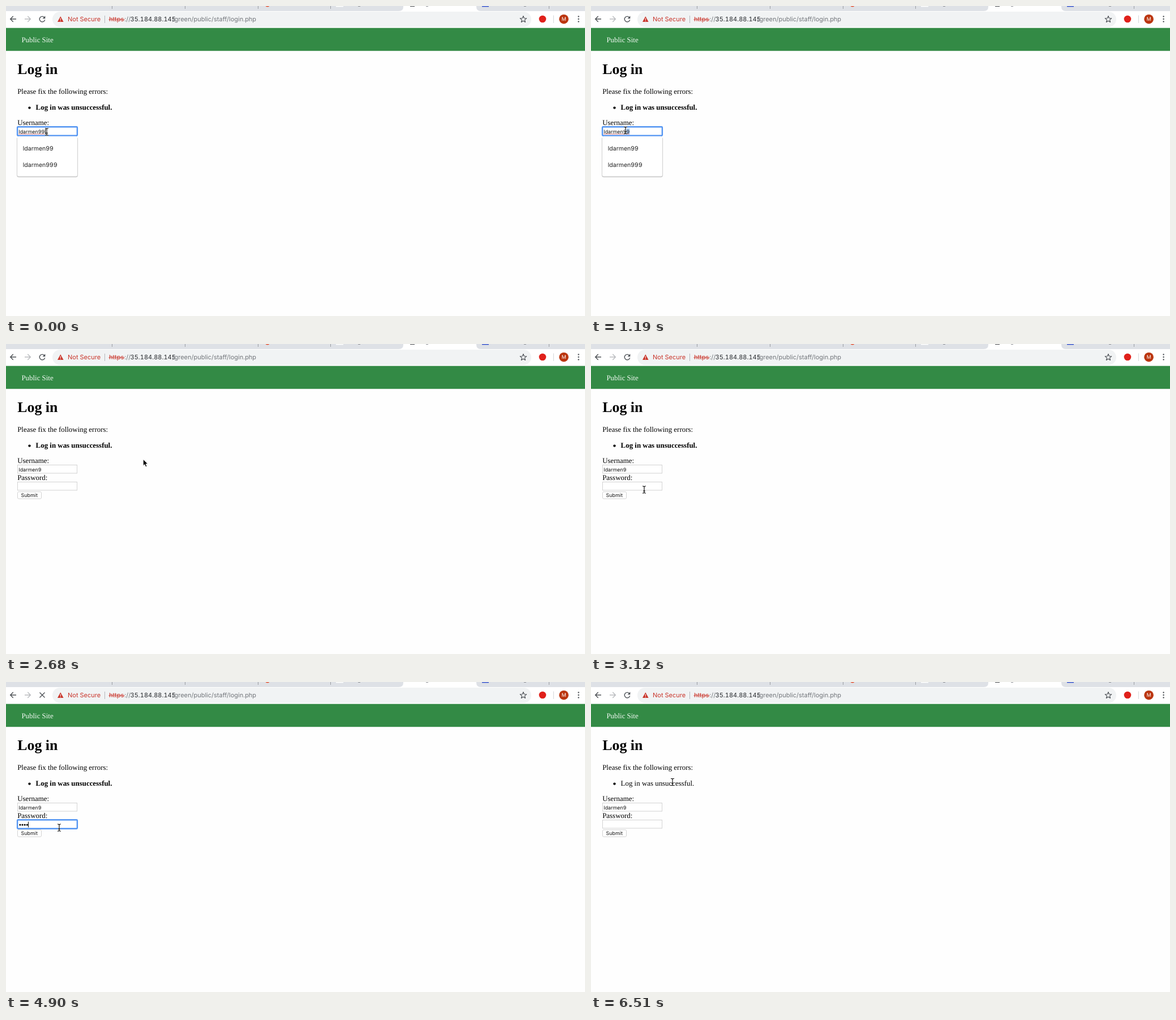
An HTML page for the animation above (8000 ms loop, 1023 by 547 pixels).

```html
<!DOCTYPE html>
<html lang="en">
<head>
<meta charset="utf-8">
<title>Log in</title>
<style>
  html, body { margin: 0; width: 100%; height: 100%; overflow: hidden; background: #fefefe; }
  svg { display: block; width: 100vw; height: 100vh; }
  text { text-rendering: geometricPrecision; white-space: pre; font-variant-numeric: tabular-nums; }
  .serif { font-family: "Liberation Serif", serif; font-size: 12.92px; fill: #000; }
  .bar { font-family: Inter, sans-serif; font-size: 11px; fill: #72767b; }
  .field { font-family: Inter, sans-serif; font-size: 8.9px; fill: #111; }
  .option { font-family: Inter, sans-serif; font-size: 10.5px; fill: #222; }
  .icon { fill: none; stroke: #4d5156; stroke-width: 1.4; }
  .box { fill: #fff; stroke: #d2d2d2; }
  .focus { fill: #fff; stroke: #5294f2; stroke-width: 2.4; }
  .caret { stroke: #000; stroke-width: 1; }
</style>
</head>
<body>
<svg viewBox="0 0 1023 547" preserveAspectRatio="none">
  <rect width="1023" height="547" fill="#fefefe"/>

  <!-- tab strip -->
  <rect width="1023" height="9" fill="#dee1e6"/>
  <path d="M694 9Q702 9 702 1V0H831V1Q831 9 839 9Z" fill="#fff"/>
  <path d="M187.5 0V5M316.5 0V5M445.5 0V5M573.5 0V5M959.5 0V5" stroke="#9a9da2"/>
  <circle cx="462" cy="-2.5" r="4" fill="#e5502f"/>
  <rect x="583" width="13" height="1.5" fill="#fff"/>
  <rect x="841" width="12" height="1.5" fill="#3f5bd0"/>
  <path d="M622 .5h4M742 .5h4M915 .5h4" stroke="#8d9095"/>
  <rect id="favicon" x="714" width="8" height="1" fill="#44474b"/>

  <!-- toolbar -->
  <rect y="9" width="1023" height="30" fill="#fff"/>
  <rect x="82" y="10" width="846" height="27" rx="13.5" fill="#f1f3f4"/>
  <path class="icon" d="M18 23H8M12.7 18L7.7 23L12.7 28"/>
  <path class="icon" style="stroke:#babcbf" d="M33 23H43M38.3 18L43.3 23L38.3 28"/>
  <g id="reload">
    <path class="icon" d="M68 20.4A4.8 4.8 0 1 0 68.7 24.4"/>
    <path d="M69.3 17.6V22.3H64.6Z" fill="#4d5156"/>
  </g>
  <path id="stop" class="icon" d="M59.5 18.5L68.5 27.5M68.5 18.5L59.5 27.5"/>
  <path d="M96.3 18.3L101.6 28H91Z" fill="#c9352b"/>
  <path d="M96.3 21.6V24.8M96.3 25.7V26.9" stroke="#fff" stroke-width="1.1"/>
  <text class="bar" x="109" y="27.3" style="fill:#c9352b">Not Secure</text>
  <path d="M174.5 17V30" stroke="#b4b7bb"/>
  <text class="bar" x="182" y="27.3" style="fill:#c9352b">https</text>
  <path d="M181.5 24H209.5" stroke="#c9352b"/>
  <text class="bar" x="209.3" y="27.3">://</text>
  <text class="bar" x="219.6" y="27.3" style="fill:#2b2e32">35.184.88.145</text>
  <text class="bar" x="293.5" y="27.3">/green/public/staff/login.php</text>
  <path id="star" class="icon" style="stroke-width:1.2" stroke-linejoin="round"/>
  <circle cx="948" cy="23" r="6.3" fill="#e0211b"/>
  <path d="M967.5 16.5V30" stroke="#d5d7da"/>
  <circle cx="985.6" cy="23.2" r="8.3" fill="#bb3610"/>
  <text x="985.6" y="26.4" text-anchor="middle" style="font:9px Roboto,sans-serif;fill:#fff">M</text>
  <g fill="#4d5156">
    <circle cx="1011.6" cy="18.5" r="1.2"/><circle cx="1011.6" cy="23" r="1.2"/><circle cx="1011.6" cy="27.5" r="1.2"/>
  </g>

  <!-- page -->
  <rect y="38.7" width="1023" height="40.5" fill="#338a45"/>
  <text class="serif" x="27.4" y="64" style="fill:#f4faf5">Public Site</text>
  <text class="serif" x="20.3" y="120" style="font-size:25.84px;font-weight:bold">Log in</text>
  <text class="serif" x="20.2" y="155.3">Please fix the following errors:</text>
  <circle cx="41.5" cy="179.6" r="2.2"/>
  <text class="serif" id="error" x="52.6" y="182.9">Log in was unsuccessful.</text>
  <text class="serif" x="20.2" y="210.3">Username:</text>
  <text class="serif" x="20.2" y="240.3">Password:</text>
  <rect class="box" x="20.5" y="260.8" width="42" height="12.2" rx="2"/>
  <text class="field" x="26.6" y="270.1">Submit</text>
  <rect id="userBox"/>
  <rect id="passBox"/>
  <rect id="selection" y="216" height="10.5" fill="#b4d5fe"/>
  <text class="field" id="user" x="22.5" y="225"/>
  <path id="squiggle" fill="none" stroke="#dd4b45" stroke-dasharray="1.6 .8"/>
  <g id="dots"></g>
  <path id="userCaret" class="caret"/>
  <path id="passCaret" class="caret"/>

  <!-- suggestions -->
  <g id="list">
    <rect id="listGlow" x="18.8" y="231.6" width="108.4" rx="3.5" fill="#000" opacity=".07"/>
    <rect id="listShade" x="19.5" y="230.8" width="107" rx="3" fill="#000" opacity=".24"/>
    <rect id="listBox" x="20" y="229.8" width="106" rx="2.5" fill="#fff"/>
    <g id="options"></g>
  </g>

  <!-- pointers -->
  <g id="beam" fill="none">
    <path id="beamHalo" stroke="#fff" stroke-width="2.6" opacity=".8"/>
    <path id="beamLine" stroke="#000" stroke-width="1.1"/>
  </g>
  <path id="arrow" d="M0 0V11.4L2.6 9L4.5 13.2L6.5 12.3L4.7 8.2H8.2Z" fill="#000" stroke="#fff" stroke-width=".8"/>
</svg>
<script>
const LOOP = 8000;
const NAME = 'ldarmen';
const $ = id => document.getElementById(id);
const set = (id, attrs) => {
  for (const key in attrs) $(id).setAttribute(key, attrs[key]);
};
const show = (id, on) => set(id, { visibility: on ? 'visible' : 'hidden' });

// Each step overrides part of the state from its time on.
const steps = [
  [0, { user: '99', focus: 'user', options: ['99', '999'], userCaret: 69.5, select: 0, passCaret: 0,
        dots: 0, loading: false, icon: true, bold: true, shape: 'beam', at: [72, 222] }],
  [150, { at: [66, 222] }],
  [420, { at: [60, 222], select: 62.2, userCaret: 0 }],
  [570, { at: [53, 221], select: 51.5 }],
  [720, { at: [49.5, 220] }],
  [870, { at: [53, 220] }],
  [1040, { at: [58, 219.5], select: 56.7 }],
  [1190, { at: [61, 219.5], select: 62.2 }],
  [2090, { user: '9', options: ['9', '99', '999'], select: 0, userCaret: 63.5 }],
  [2390, { at: [150, 208], shape: 'arrow' }],
  [2540, { at: [242.4, 198], focus: '', options: [], userCaret: 0 }],
  [2680, { at: [242.4, 203.5] }],
  [2830, { at: [190, 226] }],
  [2980, { at: [120, 250], shape: 'beam' }],
  [3120, { at: [94, 257] }],
  [3270, { focus: 'pass', passCaret: 23.5 }],
  [3870, { passCaret: 0 }],
  ...[4020, 4170, 4310, 4460].map((t, i) => [t, { dots: i + 1, passCaret: 27 + 4.15 * i }]),
  [4900, { loading: true, icon: false }],
  [5050, { passCaret: 0 }],
  [5350, { focus: '', dots: 0, bold: false }],
  [5500, { loading: false }],
  [5700, { icon: true }],
  [6010, { at: [97, 250] }],
  [6170, { at: [114, 230], shape: 'arrow' }],
  [6330, { at: [131.8, 202] }],
  [6510, { at: [144, 176.5], shape: 'beam' }]
];

const star = Array.from({ length: 10 }, (_, i) => {
  const r = i % 2 ? 2.6 : 6, a = Math.PI * (i / 5 - .5);
  return [914 + r * Math.cos(a), 23.6 + r * Math.sin(a)].join(' ');
});
set('star', { d: `M${star.join('L')}Z` });

const beam = 'M-3 -6.2Q0 -6.2 0 -4.8Q0 -6.2 3 -6.2M0 -4.8V4.8M-3 6.2Q0 6.2 0 4.8Q0 6.2 3 6.2M-1.7 2.4H1.7';
set('beamHalo', { d: beam });
set('beamLine', { d: beam });

function drawBox(id, y, focused) {
  set(id, focused
    ? { class: 'focus', x: 20.1, y: y - .3, width: 105.8, height: 15.6, rx: 1.2 }
    : { class: 'box', x: 20.5, y, width: 105, height: 14.5, rx: 0 });
}

function drawCaret(id, x, y) {
  show(id, x > 0);
  set(id, { d: `M${x} ${y}v10` });
}

function drawList(options) {
  show('list', options.length);
  const height = 13 + 29 * options.length;
  for (const id of ['listBox', 'listShade', 'listGlow']) set(id, { height });
  $('options').innerHTML = options
    .map((end, i) => `<text class="option" x="29.8" y="${254.8 + 29 * i}">${NAME + end}</text>`).join('');
}

function draw(t) {
  const s = Object.assign({}, ...steps.filter(([start]) => start <= t).map(step => step[1]));
  show('favicon', s.icon);
  show('reload', !s.loading);
  show('stop', s.loading);
  $('error').style.fontWeight = s.bold ? 'bold' : 'normal';

  drawBox('userBox', 213.5, s.focus === 'user');
  drawBox('passBox', 243.5, s.focus === 'pass');
  $('user').textContent = NAME + s.user;
  show('selection', s.select);
  set('selection', { x: s.select, width: s.select ? 68.5 - s.select : 0 });
  show('squiggle', s.focus === 'user');
  set('squiggle', { d: `M22.5 226H${57 + 5.6 * s.user.length}` });
  drawCaret('userCaret', s.userCaret, 216.5);
  drawCaret('passCaret', s.passCaret, 246.5);
  $('dots').innerHTML = Array.from({ length: s.dots },
    (_, i) => `<circle cx="${24.9 + 4.15 * i}" cy="252" r="1.6"/>`).join('');
  drawList(s.options);

  show('beam', s.shape === 'beam');
  show('arrow', s.shape === 'arrow');
  set(s.shape, { transform: `translate(${s.at})` });
}

const begin = performance.now();
function tick() {
  draw((performance.now() - begin) % LOOP);
  requestAnimationFrame(tick);
}
tick();
</script>
</body>
</html>
```
